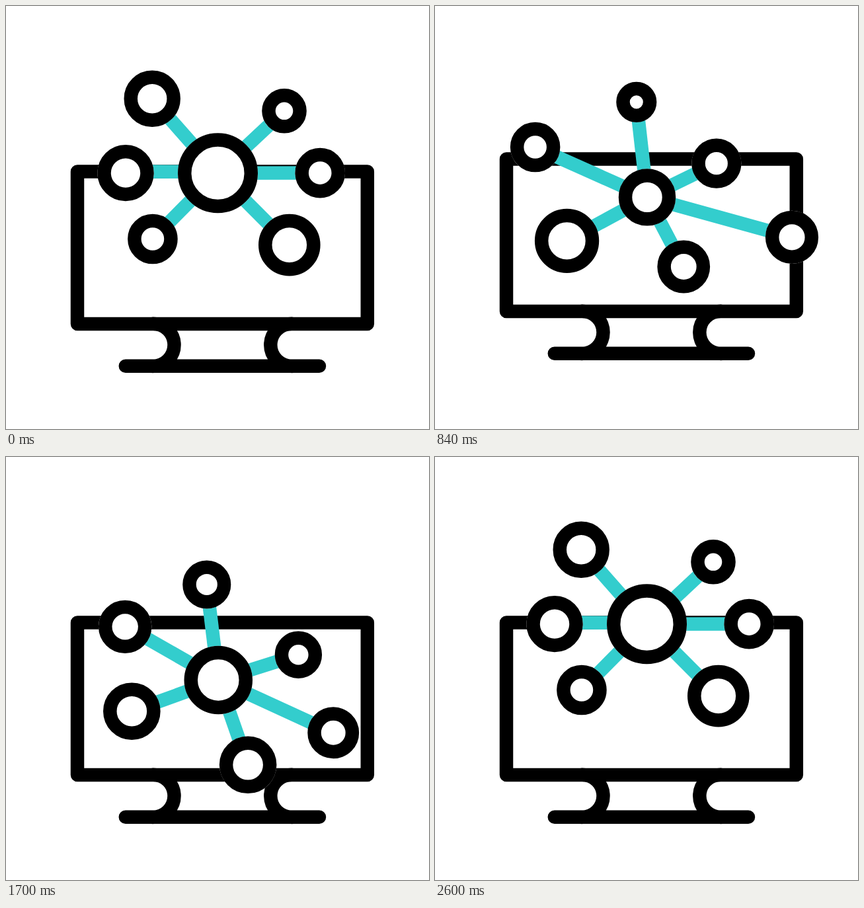
Animation, 640 px wide and 640 px high, one loop 2820 ms. Source, as an HTML page:

```html
<!DOCTYPE html>
<html lang="en">
<head>
<meta charset="utf-8">
<title>Network monitor</title>
<style>
  html, body { margin: 0; width: 100%; height: 100%; overflow: hidden; background: #fff; }
  svg { display: block; width: 100vw; height: 100vh; }
</style>
</head>
<body>
<svg viewBox="0 0 640 640" fill="none" stroke="#000" stroke-width="20.5">
  <g id="screen" stroke-linecap="round" stroke-linejoin="round">
    <rect x="108" y="250.5" width="438.8" height="230.5"/>
    <path d="M222.4 480.7a32.1 32.1 0 0 1 0 64.2M432.4 480.7a32.1 32.1 0 0 0 0 64.2M180.8 544.7H474"/>
  </g>
  <g id="links" stroke="#33cdcd"></g>
  <g id="nodes"></g>
</svg>
<script>
const LOOP = 2820, STEP = 20, HOLD = 200, HALF = 60;

// Offset from the hub and outer radius at rest, then their change when spread.
const satellites = [
  { x: -99.3, y: -112.5, r: 42.7, dx: 43.4, dy: -21.3, dr: -12.3 },
  { x: 100.5, y: -94, r: 33.8, dx: -14.7, dy: 15.3, dr: 3.8 },
  { x: 154.7, y: -0.2, r: 37.8, dx: 73.4, dy: -4, dr: 2.3 },
  { x: 108.3, y: 108.8, r: 46.8, dx: -25.8, dy: -24, dr: -7 },
  { x: -98.6, y: 99.7, r: 37.8, dx: 0.9, dy: -2, dr: 11 },
  { x: -139.5, y: -0.2, r: 42.7, dx: -45, dy: -24.7, dr: -5, lift: -2 }
];

const el = id => document.getElementById(id);
const smooth = k => k * k * (3 - 2 * k);

function add(parent, tag) {
  const node = document.createElementNS("http://www.w3.org/2000/svg", tag);
  return el(parent).appendChild(node);
}

function set(node, attrs) {
  for (const key in attrs) node.setAttribute(key, attrs[key]);
}

function makeDisc() {
  const disc = { back: add("nodes", "circle"), ring: add("nodes", "circle") };
  set(disc.back, { fill: "#fff", stroke: "none" });
  return disc;
}

function placeDisc(disc, x, y, r) {
  set(disc.back, { cx: x, cy: y, r });
  set(disc.ring, { cx: x, cy: y, r: r - 10.25 });
}

for (const s of satellites) {
  s.link = add("links", "line");
  s.disc = makeDisc();
}
const hub = makeDisc();

function draw(ms) {
  const step = Math.floor((ms % LOOP - HOLD) / STEP);
  const n = Math.min(2 * HALF, Math.max(0, step));
  const u = HALF - Math.abs(n - HALF);          // out and back
  const travel = smooth(u / HALF);
  const spread = smooth(1 - Math.abs(u / 30 - 1));
  const bob = u < 30 ? -19.5 * spread : 19.5 - 39 * spread;
  const angle = travel * Math.PI / 6;
  const cos = Math.cos(angle), sin = Math.sin(angle);
  const hx = 320.5 + 0.9 * travel;
  const hy = 252.8 + 100 * travel + 0.6 * spread + bob;
  const turn = (x, y) => [hx + x * cos - y * sin, hy + x * sin + y * cos];

  set(el("screen"), { transform: `translate(0 ${bob})` });
  placeDisc(hub, hx, hy, 60.5 - 17.5 * spread);

  for (const s of satellites) {
    const lx = s.x + s.dx * spread, ly = s.y + s.dy * spread;
    const lift = (s.lift || 0) * (1 - spread);
    const [x1, y1] = turn(0, lift);
    const [x2, y2] = turn(lx, ly + lift);
    set(s.link, { x1, y1, x2, y2 });
    placeDisc(s.disc, ...turn(lx, ly), s.r + s.dr * spread);
  }
}

const start = performance.now();
function tick() {
  draw(performance.now() - start);
  requestAnimationFrame(tick);
}
tick();
</script>
</body>
</html>
```
